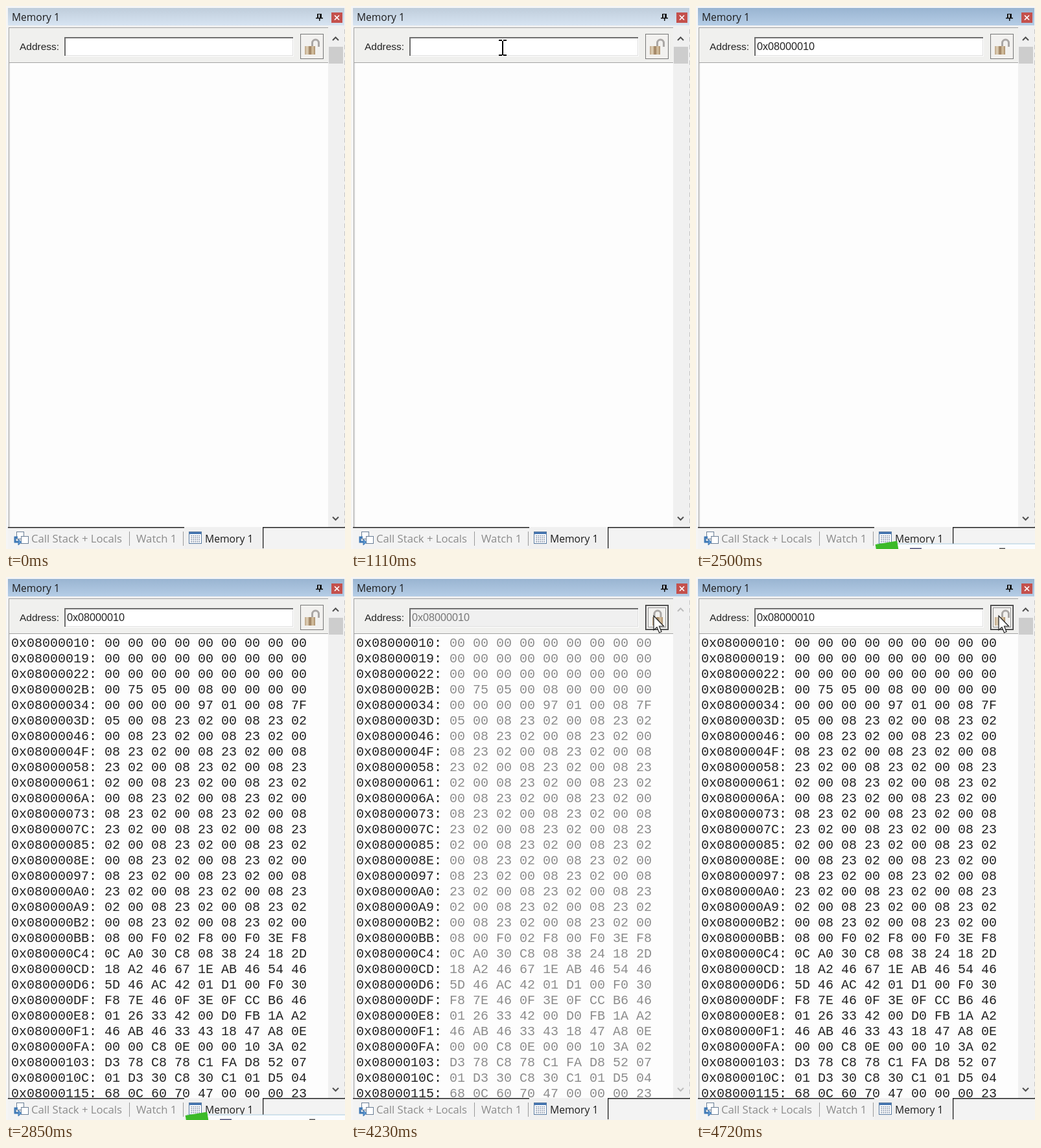
Animation of 523 by 839 pixels, one loop 4780 ms. Source, as an HTML page with a canvas:

```html
<!DOCTYPE html>
<html lang="en">
<head>
<meta charset="utf-8">
<title>Memory window</title>
<style>
html, body { margin: 0; height: 100%; overflow: hidden; background: #f0f0f0 }
canvas { display: block }
</style>
</head>
<body>
<canvas id="stage" width="523" height="839"></canvas>
<script>
const g = document.getElementById('stage').getContext('2d');
const LOOP = 4780, STEP = LOOP / 69;
const ADDRESS = '0x08000010';
const UI = 'px "Open Sans", "Noto Sans", sans-serif';
const SANS = 'px "Liberation Sans", Arial, sans-serif';
const MONO = 'px "Liberation Mono", "Courier New", monospace';

// Memory dump: zeros, a repeated vector, then code bytes
const dump = ('00'.repeat(28) + '7505000800000000' + '00000000970100087F' + '05' +
  '00082302'.repeat(31) + '0008' + '00F002F800F03EF8' +
  '0CA030C8083824182D' + '18A246671EAB465446' + '5D46AC4201D100F030' +
  'F87E460F3E0FCCB646' + '0126334200D0FB1AA2' + '46AB4633431847A80E' +
  '0000C80E0000103A02' + 'D378C878C1FAD85207' + '01D330C830C101D504' +
  '680C60704700000023').match(/.{18}/g).map(row => row.match(/../g).join(' '));

// Pointer stops: time, x, y
const stops = [[70, 430, 845], [550, 252, 60], [620, 249, 53], [900, 234, 64],
  [2850, 234, 64], [3090, 300, 76], [3320, 381, 74], [3600, 442, 64],
  [3880, 465, 61], [3950, 467, 60], [LOOP, 467, 60]];

function rect(x, y, w, h, color) {
  g.fillStyle = color;
  g.fillRect(x, y, w, h);
}
function text(s, x, y, font, color) {
  g.font = font;
  g.fillStyle = color;
  g.fillText(s, x, y);
}
function line(points, color, width = 1, fill) {
  g.beginPath();
  points.forEach(([x, y]) => g.lineTo(x, y));
  if (fill) {
    g.closePath();
    g.fillStyle = fill;
    g.fill();
  }
  g.strokeStyle = color;
  g.lineWidth = width;
  g.stroke();
}
function frame(x, y, w, h, color, dash = []) {
  g.setLineDash(dash);
  g.strokeStyle = color;
  g.lineWidth = 1;
  g.strokeRect(x + .5, y + .5, w - 1, h - 1);
  g.setLineDash([]);
}
function gradient(x0, y0, x1, y1, ...colors) {
  const fill = g.createLinearGradient(x0, y0, x1, y1);
  colors.forEach((c, i) => fill.addColorStop(i / (colors.length - 1), c));
  return fill;
}

function titleBar(active) {
  const [top, bottom] = active ? ['#99b4d1', '#b5cde6'] : ['#bfcddb', '#d7e4f2'];
  rect(3, 3, 519, 27, gradient(0, 3, 0, 30, top, bottom));
  text('Memory 1', 9, 23, 15.6 + UI, '#1c1c1c');
  rect(480, 12, 7, 6, '#111');
  rect(482, 13, 2, 5, '#d4e0ec');
  rect(478, 18, 11, 1.5, '#111');
  rect(483, 19, 1.5, 4, '#111');
  rect(502, 10, 17, 16, '#c4504c');
  line([[507, 14.5], [514, 21.5]], '#fff', 1.7);
  line([[514, 14.5], [507, 21.5]], '#fff', 1.7);
}

function addressBar(value, caret, locked) {
  rect(5, 34, 492, 53, '#f0f0ee');
  rect(5, 33, 492, 1, '#a0a0a0');
  rect(5, 87, 492, 1, '#a3a3a3');
  text('Address:', 21, 68, 15.5 + SANS, '#222');
  rect(90, 48, 354, 30, '#fff');
  rect(90, 48, 353, 29, '#6e6e6e');
  rect(92, 50, 351, 27, '#dedede');
  rect(92, 50, 350, 26, locked ? '#f0f0f0' : '#fff');
  text(value, 94, 68, 16.2 + SANS, locked ? '#777' : '#222');
  if (caret) rect(Math.round(95 + g.measureText(value).width), 54, 1, 18, '#222');
}

function lockButton(locked, focused) {
  rect(454, 43, 36, 39, '#f2f1ef');
  frame(454, 43, 36, 39, focused ? '#333' : '#777');
  if (focused) {
    frame(455, 44, 34, 37, '#777');
    frame(458, 47, 28, 31, '#333', [1, 1]);
  }
  const body = locked ? 465 : 461, shackle = locked ? 473 : 477.5;
  g.strokeStyle = '#aaa7a5';
  g.lineWidth = 3;
  g.beginPath();
  g.moveTo(shackle - 5, 64);
  g.lineTo(shackle - 5, 57);
  g.arc(shackle, 57, 5, Math.PI, 0);
  g.lineTo(shackle + 5, 63);
  g.stroke();
  rect(body, 62, 16, 13, gradient(body, 0, body + 16, 0, '#bda585', '#e4d5bd', '#987a58', '#d9c5a6', '#a98c68'));
}

function scrollBar(locked) {
  rect(497, 34, 25, 771, '#f0f0f0');
  if (!locked) rect(498, 63, 22, 26, '#cdcdcd');
  const ink = locked ? '#bcbcbc' : '#505050';
  line([[504, 53], [508.5, 48.5], [513, 53]], ink, 2);
  line([[504, 789.5], [508.5, 794], [513, 789.5]], ink, 2);
}

function memoryView(shown, locked) {
  rect(7, 88, 490, 717, '#fdfdfd');
  if (!shown) return;
  g.save();
  g.beginPath();
  g.rect(7, 88, 490, 716);
  g.clip();
  dump.forEach((bytes, i) => {
    const y = 108 + 24 * i;
    const label = '0x' + (0x08000010 + 9 * i).toString(16).toUpperCase().padStart(8, '0') + ':';
    text(label, 8, y, 20 + MONO, '#222');
    text(bytes, 152, y, 20 + MONO, locked ? '#8c8c8c' : '#222');
  });
  g.restore();
}

function tabs() {
  rect(3, 805, 520, 34, '#f3f3f3');
  rect(3, 805, 520, 1.5, '#222');
  rect(275, 805, 121, 34, '#f0f0f0');
  rect(396, 805, 1.3, 33, '#222');
  rect(190, 812, 1, 22, '#999');
  rect(273, 812, 1, 22, '#999');
  text('Call Stack + Locals', 39, 829, 16.7 + UI, '#8b8b8b');
  text('Watch 1', 201, 829, 16.7 + UI, '#8b8b8b');
  text('Memory 1', 307, 829, 15.7 + UI, '#1c1c1c');

  for (const [x, y] of [[16, 812], [23, 819]]) {
    rect(x, y, 12, 12, '#fff');
    frame(x, y, 12, 12, '#6a7e96');
  }
  line([[18, 821], [14, 821], [14, 828], [20, 828]], '#3e78b5', 3);
  line([[19, 824], [24, 828.5], [19, 833]], '#3e78b5', 1, '#5b95ce');

  rect(282, 812, 20, 19, '#fff');
  rect(282, 812, 20, 4, '#4777b2');
  frame(282, 812, 20, 19, '#56789f');
  for (let y = 818; y < 830; y += 3)
    for (let x = 285; x < 300; x += 3) rect(x, y, 2, 1.5, '#8291a8');
}

function inputStrip() {
  rect(279, 831, 244, 8, '#fbfdff');
  rect(279, 830.5, 244, 1, '#a9cbe0');
  g.save();
  g.translate(296, 845);
  g.rotate(-.16);
  rect(-17, -16, 34, 32, '#3cba28');
  g.restore();
  rect(330, 837.5, 18, 2, '#4a4a78');
  rect(468, 837.5, 9, 2, '#555');
}

function pointer(t) {
  if (t < 70 || t > 1700 && t < 2850) return;
  const i = stops.findIndex(s => s[0] > t);
  const [t0, x0, y0] = stops[i - 1], [t1, x1, y1] = stops[i];
  const k = (t - t0) / (t1 - t0);
  const x = x0 + (x1 - x0) * k, y = y0 + (y1 - y0) * k;
  g.save();
  g.translate(Math.round(x), Math.round(y));
  if (x > 90 && x < 444 && y > 48 && y < 78) {
    rect(-1, -10, 2, 22, '#000');
    for (const edge of [-12, 11]) {
      rect(-6, edge, 5, 2, '#000');
      rect(1, edge, 5, 2, '#000');
    }
  } else {
    line([[0, 0], [0, 22], [5, 17.5], [8.5, 26], [12, 24.5], [8.5, 16], [15.5, 16], [0, 0]], '#222', 1.2, '#fff');
  }
  g.restore();
}

function draw(now) {
  const t = Math.floor((now % LOOP + 5) / STEP) * STEP % LOOP;
  const active = t > 1240, locked = t > 4100 && t < 4600;
  const typed = t < 1440 ? 0 : t < 1520 ? 1 : 2 + Math.max(0, Math.ceil((t - 1670) / STEP));
  const caret = active && t < 2450 || t > 2980 && t < 3510;

  rect(0, 0, 523, 839, '#f5f5f5');
  rect(3, 30, 520, 775, '#f0f0f0');
  rect(4, 33, 1, 772, '#a5a5a5');
  titleBar(active);
  memoryView(t > 2600, locked);
  addressBar(ADDRESS.slice(0, typed), caret, locked);
  lockButton(locked, t > 4020);
  scrollBar(locked);
  for (let y = 36; y < 805; y += 12) rect(522, y, 1, 7, '#c4c4c4');
  tabs();
  if (active && t < 4100) inputStrip();
  pointer(t);
  requestAnimationFrame(loop);
}
function loop() {
  draw(performance.now());
}
loop();
</script>
</body>
</html>
```
